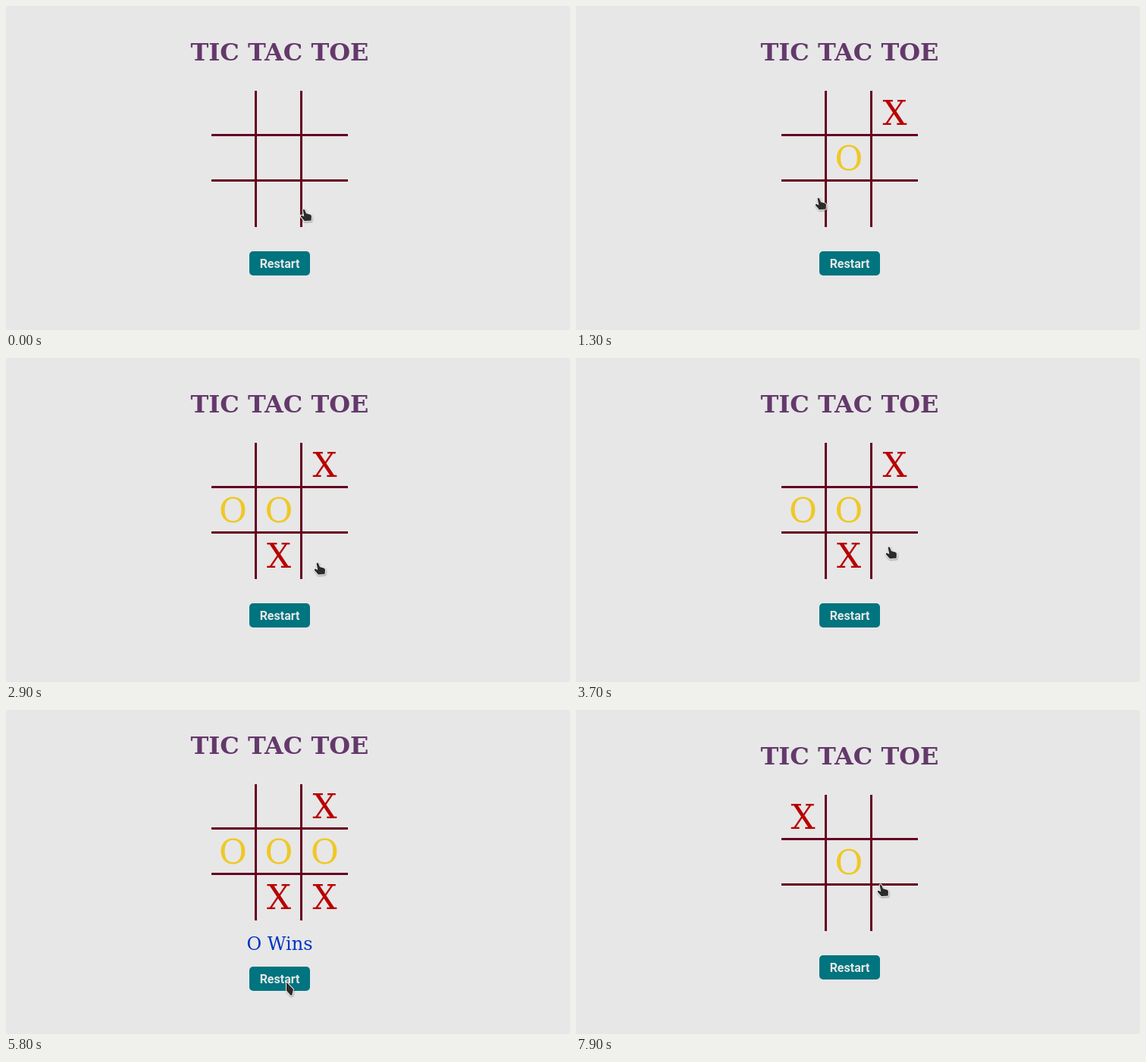
Animation of 744 by 428 pixels, one loop 8 s. Source, as an HTML page with a canvas:

```html
<!DOCTYPE html>
<html lang="en">
<head>
<meta charset="utf-8">
<title>Tic Tac Toe</title>
<style>
  html, body { margin: 0; width: 100%; height: 100%; overflow: hidden; background: #e7e7e7; }
  canvas { display: block; width: 744px; height: 428px; }
</style>
</head>
<body>
<canvas id="stage" width="744" height="428"></canvas>
<script>
const ctx = document.getElementById("stage").getContext("2d");
const LOOP = 8000, STEP = 100;
const WIN_AT = 3900, RESET_AT = 6000;
const LEFT = 271, CELL = 60, SIZE = 3 * CELL, CENTER = LEFT + SIZE / 2;
const SERIF = '"DejaVu Serif", serif';
const COLORS = { X: "#b80000", O: "#efc826" };

// Cells are numbered row by row; X plays on each click and O answers at once.
const rounds = [
  { from: 0, to: RESET_AT, clicks: [800, 2200, WIN_AT], cells: [2, 4, 7, 3, 8, 5] },
  { from: RESET_AT, to: LOOP, clicks: [7200], cells: [0, 4] }
];

// Places where the pointer comes to rest.
const start = { x: 393, y: 268 };
const stops = [
  { at: 500, travel: 500, x: 414, y: 152 },
  { at: 1300, travel: 500, x: 320, y: 253 },
  { at: 1600, travel: 100, x: 313, y: 255 },
  { at: 2000, travel: 200, x: 351, y: 256 },
  { at: 2900, travel: 700, x: 411, y: 270 },
  { at: 3300, travel: 300, x: 412, y: 215 },
  { at: 3700, travel: 200, x: 413, y: 249 },
  { at: 5400, travel: 700, x: 363, y: 358 },
  { at: 5800, travel: 100, x: 370, y: 359 },
  { at: 6800, travel: 700, x: 320, y: 147 },
  { at: 7900, travel: 400, x: 402, y: 230 }
];

const handShape = new Path2D(
  "M-1.4 1 Q-.3 -.8 1 .8 L3 5.6 L8.3 7.1 Q10 7.7 10 9.6 L9.6 15 " +
  "L.8 15.6 L-4 10 Q-4.8 8.1 -3 8 L.3 9.5 Z");
const arrowShape = new Path2D("M0 0 L0 11 L5.5 17.5 L7.4 17 L9 9.5 Z");

const clamp = p => Math.max(0, Math.min(1, p));
const mix = (a, b, p) => a + (b - a) * p;

// Vertical travel leads the horizontal one, which bows the path.
function pointerAt(t) {
  let { x, y } = start;
  for (const stop of stops) {
    const p = clamp((t - stop.at + stop.travel) / stop.travel);
    const eased = mix(p, p * p * (3 - 2 * p), 0.5);
    x = mix(x, stop.x, eased ** 1.6);
    y = mix(y, stop.y, eased);
  }
  return { x: Math.round(x), y: Math.round(y) };
}

function write(text, x, y, font, color) {
  ctx.font = font;
  ctx.fillStyle = color;
  ctx.fillText(text, x, y);
}

function drawMarks(t, top) {
  const { clicks, cells } = rounds.find(round => t >= round.from && t < round.to);
  cells.forEach((cell, turn) => {
    if (t < clicks[turn >> 1]) return;
    const sign = turn % 2 ? "O" : "X";
    const column = cell % 3, row = Math.floor(cell / 3);
    write(sign, LEFT + 28.5 + column * 60.5, top + 45 + row * CELL, `45px ${SERIF}`, COLORS[sign]);
  });
}

function drawGrid(top) {
  ctx.fillStyle = "#660020";
  for (let line = 1; line < 3; line++) {
    const offset = line * CELL - 3;
    ctx.fillRect(LEFT + offset, top, 3, SIZE);
    ctx.fillRect(LEFT, top + offset, SIZE, 3);
  }
}

function drawButton(top) {
  ctx.fillStyle = "#00747f";
  ctx.beginPath();
  ctx.roundRect(CENTER - 40, top, 80, 32, 5);
  ctx.fill();
  write("Restart", CENTER, top + 22, "bold 16px Roboto, sans-serif", "#e7e7e7");
}

function drawPointer({ x, y }, top) {
  const overBoard = x >= LEFT && x < LEFT + SIZE && y >= top && y < top + SIZE;
  const shape = overBoard ? handShape : arrowShape;
  ctx.save();
  ctx.translate(x, y + 0.5);
  ctx.lineJoin = "round";
  ctx.lineWidth = 2;
  ctx.strokeStyle = "#f4f4f4";
  ctx.shadowColor = "rgba(0,0,0,.4)";
  ctx.shadowBlur = 2;
  ctx.shadowOffsetX = 0.5;
  ctx.shadowOffsetY = 1;
  ctx.stroke(shape);
  ctx.shadowColor = "transparent";
  ctx.fillStyle = "#2b2b2b";
  ctx.fill(shape);
  ctx.restore();
}

function draw(now) {
  const t = Math.floor((now % LOOP) / STEP) * STEP;
  const won = t >= WIN_AT && t < RESET_AT;
  const top = won ? 98 : 112;

  ctx.fillStyle = "#e7e7e7";
  ctx.fillRect(0, 0, 744, 428);
  ctx.textAlign = "center";
  write("TIC TAC TOE", CENTER, top - 40, `bold 32px ${SERIF}`, "#64386b");
  drawMarks(t, top);
  drawGrid(top);
  if (won) write("O Wins", CENTER, 317, `24px ${SERIF}`, "#0033c4");
  drawButton(won ? 339 : 324);
  drawPointer(pointerAt(t), top);
}

const began = performance.now();
function tick() {
  draw(performance.now() - began);
  requestAnimationFrame(tick);
}
tick();
</script>
</body>
</html>
```
